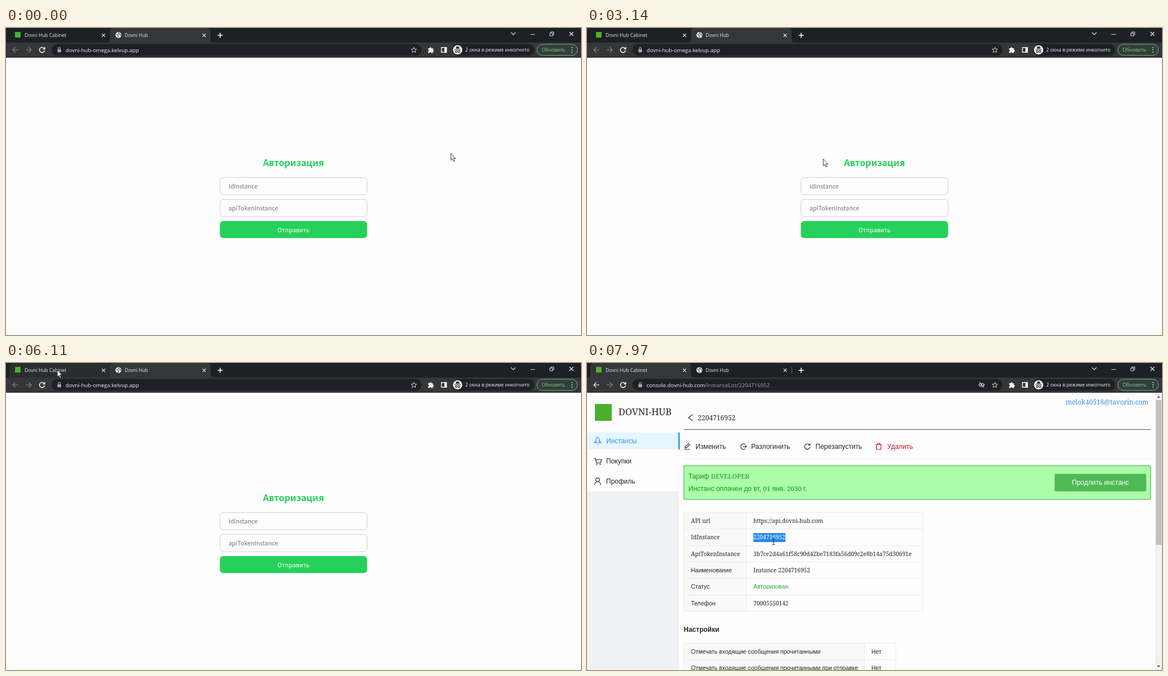
An HTML page for the animation above (8000 ms loop, 1023x547 px).

```html
<!DOCTYPE html>
<html lang="ru">
<head>
<meta charset="utf-8">
<title>Dovni Hub</title>
<style>
html, body { margin: 0; width: 100%; height: 100%; overflow: hidden; background: #fdfdfd; }
svg { display: block; width: 100%; height: 100%; }
text { white-space: pre; }
.ui { font-family: "Open Sans", sans-serif; }
.form { font-family: "Noto Sans CJK JP", "Noto Sans CJK SC", "Noto Sans", sans-serif; }
.page { font-family: "Liberation Sans", Arial, sans-serif; }
.slab { font-family: "Noto Serif", serif; font-size: .97em; }
.line { fill: none; stroke: currentColor; stroke-width: 1.2; }

.login, .console, .hover, .arrow, .beam, .picked { animation: 8s step-end infinite; }
.login { animation-name: login; }
.console { animation-name: console; }
.hover { animation-name: hover; }
.arrow { animation-name: arrow; }
.beam { animation-name: beam; }
.picked { animation-name: picked; }
.cursor { animation: move 8s linear infinite; }

@keyframes login { 0% { visibility: visible } 79.2%, 100% { visibility: hidden } }
@keyframes console { 0% { visibility: hidden } 79.2%, 100% { visibility: visible } }
@keyframes hover {
  0% { visibility: hidden } 52.5% { visibility: visible } 53.5% { visibility: hidden }
  75.6% { visibility: visible } 79.2%, 100% { visibility: hidden }
}
@keyframes arrow { 0% { visibility: visible } 93.8%, 100% { visibility: hidden } }
@keyframes beam { 0% { visibility: hidden } 93.8%, 100% { visibility: visible } }
@keyframes picked { 0% { visibility: hidden } 97%, 100% { visibility: visible } }
@keyframes move {
  0%, 32.25% { transform: translate(791px, 223px) }
  35% { transform: translate(680px, 234px) }
  39.25% { transform: translate(420px, 233px) }
  42% { transform: translate(375px, 185px) }
  47% { transform: translate(280px, 90px) }
  51% { transform: translate(205px, 10px) }
  52.1% { transform: translate(190px, 8px) }
  53% { transform: translate(130px, 14px) }
  54.25% { transform: translate(85px, 50px) }
  58% { transform: translate(82px, 62px) }
  62.1% { transform: translate(72px, 50px) }
  64% { transform: translate(90px, 29px) }
  65.5% { transform: translate(111px, 50px) }
  67% { transform: translate(104px, 84px) }
  68.375% { transform: translate(86px, 90px) }
  70% { transform: translate(58px, 93px) }
  71.2% { transform: translate(54px, 82px) }
  72.6% { transform: translate(75px, 73px) }
  75% { transform: translate(90px, 35px) }
  77.1%, 80% { transform: translate(91px, 0) }
  87% { transform: translate(290px, 190px) }
  89.6% { transform: translate(400px, 290px) }
  91% { transform: translate(434px, 320px) }
  94% { transform: translate(345px, 318px) }
  96%, 100% { transform: translate(332px, 318px) }
}
</style>
</head>
<body>
<script>
const ID = '2204716952';
const DARK = '#1d2024', BAR = '#35363a', GREEN = '#25d15a', INK = '#262626';

const rect = (x, y, w, h, fill, extra = '') =>
  `<rect x="${x}" y="${y}" width="${w}" height="${h}" fill="${fill}" ${extra}/>`;
const line = (d, color, extra = '') => `<path class="line" d="${d}" color="${color}" ${extra}/>`;
const text = (x, y, size, fill, body, extra = '') =>
  `<text x="${x}" y="${y}" font-size="${size}" fill="${fill}" ${extra}>${body}</text>`;

// Latin letters and digits are set in the serif face, Cyrillic in the sans one.
const mixed = (x, y, size, fill, body, extra) => text(x, y, size, fill,
  body.replace(/[A-Za-z0-9@:\/.-]*[A-Za-z0-9]/g, run => `<tspan class="slab">${run}</tspan>`), extra);

const tab = (x, fill, extra = '') =>
  `<path d="M${x - 6} 26q6 0 6-6V6q0-6 6-6h167q6 0 6 6v14q0 6 6 6z" fill="${fill}" ${extra}/>`;
const cross = (x, y, r) => line(`M${x - r} ${y - r}l${2 * r} ${2 * r}m0 ${-2 * r}l${-2 * r} ${2 * r}`, '#eee');

const arrows = backColor =>
  line('M22 39H12m4.5-4.5L12 39l4.5 4.5', backColor) +
  line('M35 39h10m-4.5-4.5L45 39l-4.5 4.5', '#85878a');

function tabs() {
  return rect(0, 0, 1023, 27, DARK) +
    tab(6, '#2a2c30', 'class="hover"') +
    `<g class="login">${tab(185, BAR)}</g>` +
    `<g class="console">${tab(6, BAR)}${line('M364.5 7v12', '#5f6368')}</g>` +
    rect(16, 7, 10, 10, '#4caf2c') +
    text(33, 16, 8.5, '#e8eaed', 'Dovni Hub Cabinet') +
    text(211, 16, 8.5, '#e8eaed', 'Dovni Hub') +
    '<circle cx="200" cy="12.5" r="5.3" fill="#eee"/>' +
    line('M196 11l3 1 1 2-1 3M201 8l-1 2 3 1 1 3', '#45474b', 'stroke-width="1.5"') +
    cross(173.5, 13, 2.8) + cross(352.5, 13, 2.8) +
    line('M376.5 13h9m-4.5-4.5v9', '#fff', 'style="stroke-width:1.5"') +
    line('M898.5 8l4 4 4-4M933 11.5h8', '#ddd') +
    line('M967.5 9h5v5h-5zM969.5 9V7h5v5h-2', '#ddd', 'style="stroke-width:1"') +
    cross(1006, 10.5, 3.5);
}

function toolbar() {
  return rect(0, 26, 1023, 27, BAR) +
    rect(81, 28.5, 658, 21, DARK, 'rx="10.5"') +
    `<g class="login">${arrows('#85878a')}${
      text(106, 43, 9.6, '#f1f3f4', 'dovni-hub-omega.kelvup.app')}</g>` +
    `<g class="console">${arrows('#f1f3f4')}${
      text(106, 43, 9.6, '#f1f3f4', 'console.dovni-hub.com<tspan fill="#9aa0a6">/instanceList/' + ID + '</tspan>')}${
      line('M697 39q5-6 10 0q-5 6-10 0M698 34.5l8.5 9', '#ccc')}<circle cx="702" cy="39" r="1.6" fill="#ccc"/></g>` +
    line('M68 36.5a4.6 4.6 0 1 0 .7 3.5M69 34v3.4h-3.4', '#f1f3f4', 'style="stroke-width:1.5"') +
    rect(91.5, 38, 6.5, 5.2, '#a5a8ac', 'rx="1"') + line('M93 38v-1.6a1.8 1.8 0 0 1 3.6 0V38', '#a5a8ac') +
    line('M725.7 34.3l1.4 3.2 3.4.3-2.6 2.3.8 3.4-3-1.8-3 1.8.8-3.4-2.6-2.3 3.4-.3z', '#ddd', 'style="stroke-width:1"') +
    '<path d="M751 36h2.6a1.7 1.7 0 0 1 3.4 0h2.5v2.7a1.7 1.7 0 0 1 0 3.4v2.5h-3a1.5 1.5 0 0 0-3 0H751v-3a1.5 1.5 0 0 0 0-3z" fill="#f1f3f4"/>' +
    line('M774.7 34.7h9v8.6h-9z', '#f1f3f4', 'style="stroke-width:1.4"') + rect(780, 34.5, 4, 9, '#f1f3f4') +
    rect(794, 28.5, 146, 21, DARK, 'rx="10.5"') +
    '<circle cx="803.5" cy="39" r="8.3" fill="#f1f3f4"/>' +
    '<path d="M798 38h11v1h-11zm2-1l1.2-4h4.6l1.2 4z" fill="#35363a"/>' +
    '<g class="line" color="#35363a"><circle cx="801" cy="42" r="1.7"/><circle cx="806" cy="42" r="1.7"/></g>' +
    text(817, 42, 8.5, '#f1f3f4', '2 окна в режиме инкогнито') +
    rect(944.5, 28.9, 72, 20, '#333f39', 'rx="10" stroke="#71b889"') +
    text(953, 42, 8.6, '#81c995', 'Обновить') +
    [35, 39, 43].map(y => `<circle cx="1007" cy="${y}" r="1.05" fill="#b5dfc2"/>`).join('');
}

function loginPage() {
  const field = (y, label) =>
    rect(380.8, y + .3, 261.5, 31, '#fdfdfd', 'rx="6" stroke="#c9cacf" stroke-width=".9"') +
    text(396, y + 20.3, 10.75, '#757575', label);
  return rect(0, 53, 1023, 494, '#fdfdfd') +
    text(511.5, 246, 16.2, GREEN, 'Авторизация', 'text-anchor="middle" font-weight="600"') +
    field(266, 'idInstance') + field(305, 'apiTokenInstance') +
    rect(380.5, 344, 262, 30.3, GREEN, 'rx="6"') +
    text(511.5, 363.7, 10.75, '#fff', 'Отправить', 'text-anchor="middle"');
}

function sidebar() {
  return rect(0, 53, 164, 494, '#eff1f4') + rect(0, 53, 164, 176, '#fdfdfd') +
    rect(14, 73, 30, 30, '#4caf2c') +
    mixed(56, 93, 17, INK, 'DOVNI-HUB') +
    rect(0, 124, 164, 30, '#e5f6ff') + rect(162.5, 124, 2.3, 30, '#1890d8') +
    text(34, 143, 12, '#3190e8', 'Инстансы') +
    text(34, 179, 12, INK, 'Покупки') + text(34, 215, 12, INK, 'Профиль') +
    line('M16 142v-5q0-3 3-5q3 2 3 5v5zM16 138l-3 4h3m6-4l3 4h-3M17.5 145h3', '#3190e8') +
    line('M12 170h3l2 8h7l2-6H15.6', INK) +
    `<g fill="${INK}"><circle cx="17.5" cy="180.5" r="1.1"/><circle cx="23.5" cy="180.5" r="1.1"/></g>` +
    `<circle class="line" cx="19" cy="208" r="3.3" color="${INK}"/>` + line('M13.5 217q.8-5.5 5.5-5.5t5.5 5.5', INK);
}

function actions() {
  return line('M188 92l-7.5 5.5 7.5 5.5', INK) +
    mixed(197, 102, 12.4, INK, ID) +
    mixed(999, 74, 12.2, '#3d8ee8', 'melok40518@tavorin.com', 'text-anchor="end"') +
    rect(172, 118, 831, 1, '#555') + rect(172, 170, 831, 1, '#ededf0') +
    line('M173 154h10M174.5 151.5l.6-2.6 5.5-5.3 2 2-5.5 5.3z', INK) +
    text(193, 153, 12, INK, 'Изменить') +
    line('M281.5 145.3a4.8 4.8 0 1 0 0 7.4M277 149h6.5m-2-2l2 2-2 2', INK) +
    text(292, 153, 12, INK, 'Разлогинить') +
    line('M396 146a4.8 4.8 0 1 0 .8 3.7M396.8 143.5v3h-3', INK) +
    text(406.5, 153, 12, INK, 'Перезапустить') +
    line('M513.5 145.5h11M515 146v8h8v-8M517 145v-2h4v2', '#d00c24') +
    text(534, 153, 12, '#d00c24', 'Удалить');
}

function plan() {
  return rect(172.5, 183, 830, 60, '#abfda9', 'stroke="#32b83a"') +
    mixed(180.5, 206, 12, '#15951a', 'Тариф DEVELOPER') +
    mixed(180.5, 228, 12, '#15951a', 'Инстанс оплачен до вт, 01 янв. 2030 г.') +
    rect(832, 199, 163, 30, '#379a3f', 'rx="2" opacity=".5"') +
    rect(832, 197.5, 163, 30, '#4fba54', 'rx="2"') +
    text(913.5, 217, 12, '#fff', 'Продлить инстанс', 'text-anchor="middle"');
}

function table(x, y, split, right, rows) {
  const step = 29.3, height = step * rows.length;
  return rect(x + .5, y + .5, right - x, height, '#fdfdfd', 'stroke="#ececef"') +
    rect(x + .5, y + .5, split - x, height, '#f9f9fa', 'stroke="#ececef"') +
    rows.map(([label, value, color = INK], i) => {
      const top = y + step * i, base = top + 19;
      return rect(x, Math.round(top), right - x, 1, '#ececef') +
        mixed(x + 13, base, 10.5, INK, label) + mixed(split + 13, base, 10.5, color, value);
    }).join('');
}

function consolePage() {
  return rect(0, 53, 1023, 494, '#fdfdfd') + sidebar() + actions() + plan() +
    table(172, 266, 283, 597, [
      ['API url', 'https://api.dovni-hub.com'],
      ['IdInstance', ID],
      ['ApiTokenInstance', '3b7ce2d4a61f58c90d42be7183fa56d09c2e8b14a75d30691e'],
      ['Наименование', 'Instance ' + ID],
      ['Статус', 'Авторизован', '#2ba52b'],
      ['Телефон', '70005550142'],
    ]) +
    text(172, 479, 12, INK, 'Настройки', 'font-weight="bold"') +
    table(172, 499, 493, 549, [
      ['Отмечать входящие сообщения прочитанными', 'Нет'],
      ['Отмечать входящие сообщения прочитанными при отправке', 'Нет'],
    ]) +
    `<g class="picked">${rect(296, 303, 57, 16, '#2488ee')}${mixed(296, 314.3, 10.5, '#fff', ID)}</g>` +
    rect(1011, 53, 12, 494, '#f1f1f1') + rect(1012, 66, 10, 258, '#c1c1c1') +
    '<path d="M1014 62l3-3 3 3zM1014 539l3 3 3-3z" fill="#555"/>';
}

const cursor = `<g class="cursor">
  <path class="arrow" d="M.5.5v12.2l2.8-2.5 2 4.6 2-.9-2-4.4h3.6z" fill="#fff" stroke="#222" stroke-width=".9"/>
  <path class="beam line" d="M-2.5-5.5h2l.5.5.5-.5h2M0-5V5M-2.5 5.5h2L0 5l.5.5h2" color="#222" style="stroke-width:1"/>
</g>`;

document.body.innerHTML = `<svg viewBox="0 0 1023 547">
  <g class="login form">${loginPage()}</g>
  <g class="console page">${consolePage()}</g>
  <g class="ui">${tabs()}${toolbar()}</g>
  ${cursor}
</svg>`;
</script>
</body>
</html>
```
